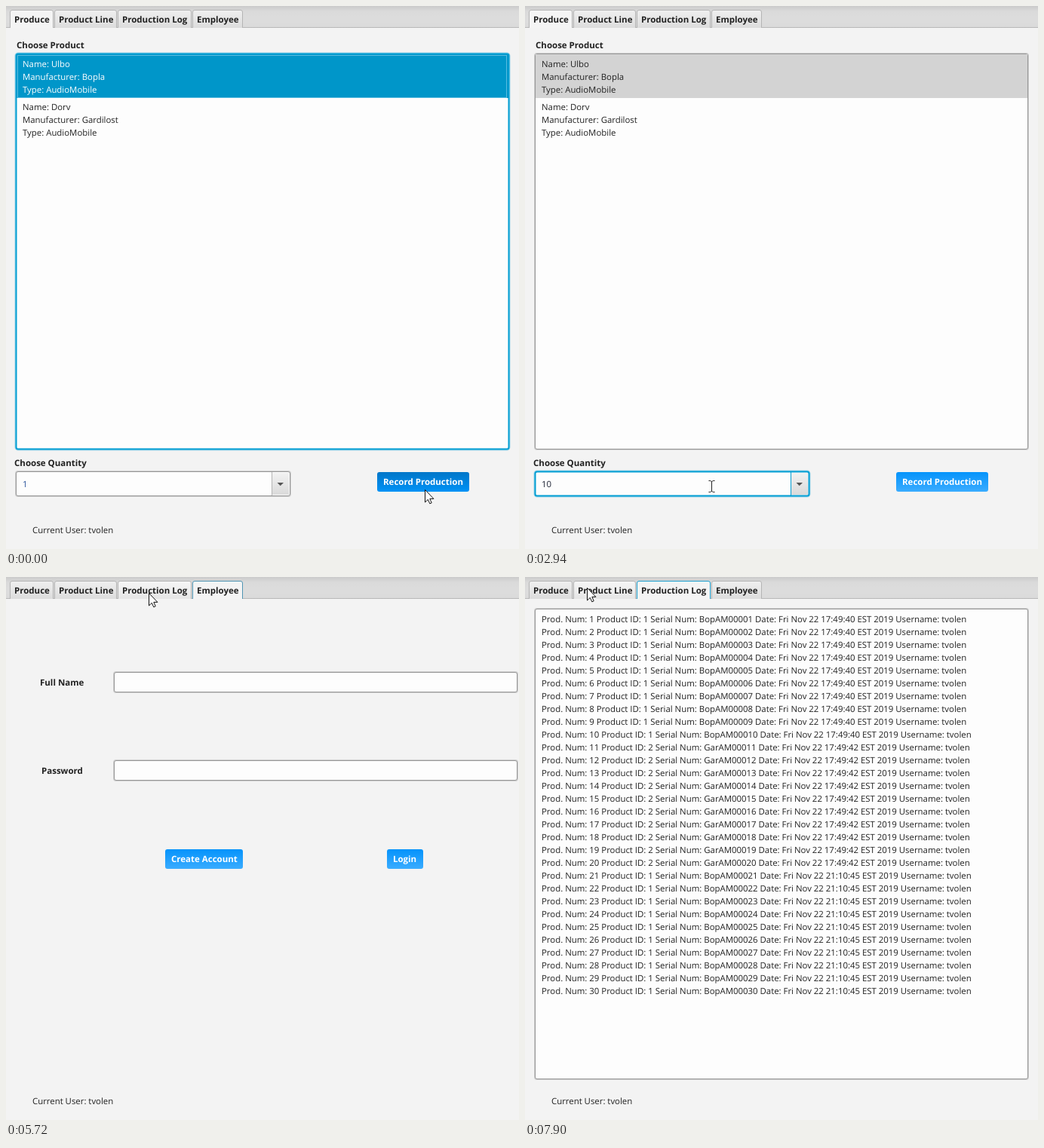
Animation of 680x720 px, one loop 8000 ms. Source, as an HTML page:

```html
<!DOCTYPE html>
<html lang="en">
<head>
<meta charset="utf-8">
<title>Production tracker</title>
<style>
  html, body { margin: 0; width: 100%; height: 100%; overflow: hidden; background: #f3f3f3; }
  svg { display: block; }
  text { font: 11.4px "Open Sans", "Noto Sans", sans-serif; fill: #222; white-space: pre; text-rendering: geometricPrecision; }
  .bold { font-weight: 700; font-size: 11.5px; }
  .button text { fill: #fff; }
  .button.hover rect { fill: url(#buttonHover); }
  .button.pressed rect { fill: url(#buttonPressed); }
  .box { fill: #fdfdfd; stroke: #979797; }
  .halo { fill: none; stroke: #8a8a8a; stroke-opacity: .35; stroke-width: 3; }
  .focused .box { stroke: #039ed3; stroke-width: 2; }
  .focused .halo { stroke: #039ed3; stroke-opacity: .35; stroke-width: 4; }
  .focused .divider { stroke: #039ed3; }
  .divider { stroke: #b5b5b5; }
  .tab path { fill: url(#tab); stroke: #b4b4b4; }
  .tab.hover path { fill: url(#tabHover); }
  .tab.selected path { fill: #f4f4f4; }
  .tab.focused path { stroke: #1a9fcf; }
  #tab-employee.focused path { stroke: #4f95b3; }
  .row { fill: #d3d3d3; }
  .ring { fill: none; stroke: #58bce0; visibility: hidden; }
  #products.focused .row { fill: #0096c9; }
  #products.focused .ring { visibility: visible; }
  #products.focused .chosen text { fill: #fff; }
  #status { font-size: 18.9px; fill: #000; }
</style>
</head>
<body>
<svg id="stage" width="680" height="720" viewBox="0 0 680 720"></svg>
<script>
const LOOP = 8000;
const USER = 'tvolen';

const text = (x, y, str, attrs = '') => `<text x="${x}" y="${y}" ${attrs}>${str}</text>`;
const bold = (x, y, str) => text(x, y, str, 'class="bold"');
const gradient = (id, ...colors) =>
  `<linearGradient id="${id}" x2="0" y2="1">${colors.map((c, i) =>
    `<stop offset="${i / (colors.length - 1)}" stop-color="${c}"/>`).join('')}</linearGradient>`;

// Bordered white box given by its outer edges
const box = (left, top, right, bottom) => {
  const frame = `x="${left + .5}" y="${top + .5}" width="${right - left - 1}" height="${bottom - top - 1}" rx="2.5"`;
  return `<rect class="halo" ${frame}/><rect class="box" ${frame}/>`;
};

const button = (id, x, y, width, label) =>
  `<g class="button" id="${id}"><rect x="${x}" y="${y}" width="${width}" height="26" rx="3" fill="url(#button)"/>
   ${bold(x + 8, y + 17, label)}</g>`;

const tabs = [
  { id: 'produce', left: 5, right: 63, label: 'Produce' },
  { id: 'line', left: 64, right: 147, label: 'Product Line' },
  { id: 'log', left: 148, right: 246, label: 'Production Log' },
  { id: 'employee', left: 247, right: 314, label: 'Employee' },
];
const tabMarkup = ({ id, left, right, label }) =>
  `<g class="tab" id="tab-${id}">
   <path d="M${left + .5} 29V8q0-2.5 2.5-2.5H${right - 3}q2.5 0 2.5 2.5V29"/>
   ${bold(left + 6, 22, label)}</g>`;

const product = (y, name, maker) =>
  [`Name: ${name}`, `Manufacturer: ${maker}`, 'Type: AudioMobile']
    .map((line, i) => text(22, y + 17 * i, line)).join('');

const logRow = (_, i) => {
  const n = i + 1;
  const second = n > 10 && n <= 20;
  const time = n <= 10 ? '17:49:40' : second ? '17:49:42' : '21:10:45';
  const serial = (second ? 'Gar' : 'Bop') + 'AM' + String(n).padStart(5, '0');
  return text(22, 60 + 17 * i,
    `Prod. Num: ${n} Product ID: ${second ? 2 : 1} Serial Num: ${serial} Date: Fri Nov 22 ${time} EST 2019 Username: ${USER}`);
};

const $ = id => document.getElementById(id);

$('stage').innerHTML = `
  <defs>
    ${gradient('header', '#cbcbcb', '#dadada', '#dcdcdc', '#dcdcdc', '#dadada')}
    ${gradient('tab', '#efefef', '#e6e6e6', '#dcdcdc')}
    ${gradient('tabHover', '#f6f6f6', '#eeeeee', '#e5e5e5')}
    ${gradient('arrowButton', '#f2f2f2', '#dadada')}
    ${gradient('button', '#0593fb', '#3aacff')}
    ${gradient('buttonHover', '#0076c8', '#0092f6')}
    ${gradient('buttonPressed', '#0068b2', '#0080d8')}
  </defs>
  <rect width="680" height="720" fill="#f3f3f3"/>
  <rect width="680" height="28" fill="url(#header)"/>
  <rect y="28" width="680" height="1" fill="#b8b8b8"/>
  ${tabs.map(tabMarkup).join('')}
  <g id="page-produce">
    ${bold(14, 56, 'Choose Product')}
    <g id="products">
      ${box(13, 63, 667, 588)}
      <rect class="row" x="14" y="64" width="652" height="58"/>
      <rect class="ring" x="15.5" y="65.5" width="648" height="56"/>
      <g class="chosen">${product(81, 'Ulbo', 'Bopla')}</g>
      ${product(138, 'Dorv', 'Gardilost')}
    </g>
    ${bold(11, 610, 'Choose Quantity')}
    <g id="quantity">
      ${box(13, 617, 377, 650)}
      <rect x="352" y="619" width="23" height="29" fill="url(#arrowButton)"/>
      <path class="divider" d="M352.5 618V649"/>
      <path d="M359.5 632H368L363.7 636.3Z" fill="#555"/>
    </g>
    ${text(22, 638, '', 'id="amount"')}
    <rect id="caret" y="624" width="1" height="19" fill="#333"/>
    ${button('record', 492, 618, 122, 'Record Production')}
    ${text(14, 677, 'Production Recorded', 'id="status"')}
  </g>
  <g id="page-employee">
    ${bold(45, 144, 'Full Name')}${box(143, 126, 678, 153)}
    ${bold(47, 261, 'Password')}${box(143, 243, 678, 270)}
    ${button('create', 211, 361, 103, 'Create Account')}
    ${button('login', 505, 361, 48, 'Login')}
  </g>
  <g id="page-log">
    ${box(13, 42, 667, 666)}
    ${Array.from({ length: 30 }, logRow).join('')}
  </g>
  ${text(35, 699, `Current User: ${USER}`)}
  <path id="arrow" d="M.5 .5V17L4.3 13.4 6.8 18.9 9.2 17.8 6.8 12.4H11.9Z" fill="#fff" stroke="#111"/>
  <path id="beam" d="M-3.5-7.5H-1.5L.5-6.5 2.5-7.5H4.5M.5-6.5V6.5M-3.5 7.5H-1.5L.5 6.5 2.5 7.5H4.5"
    fill="none" stroke="#222"/>`;

// Pointer moves: start, end, x, y
const start = [555, 641];
const moves = [
  [60, 580, 248, 637],
  [870, 880, 247, 637],
  [3110, 3480, 615, 636],
  [3480, 3580, 600, 634],
  [3980, 4480, 249, 14],
  [4480, 4610, 274, 17],
  [5560, 5715, 189, 21],
  [5975, 6480, 409, 349],
  [7380, 7780, 68, 9],
  [7780, 7890, 82, 14],
];

function pointerAt(t) {
  let [x, y] = start;
  for (const [from, to, nextX, nextY] of moves) {
    if (t < from) break;
    const p = Math.min(1, (t - from) / (to - from));
    const eased = p * p * (3 - 2 * p);
    x += (nextX - x) * eased;
    y += (nextY - y) * eased;
  }
  return [Math.round(x), Math.round(y)];
}

// Caret: on, off, x
const carets = [[760, 1220, 28], [1460, 1980, 21.5], [2260, 2430, 28], [2430, 2940, 34.5]];

const show = (id, on) => { $(id).style.display = on ? '' : 'none'; };
const flag = (id, name, on) => $(id).classList.toggle(name, on);

function draw(t) {
  const [x, y] = pointerAt(t);
  const inside = (left, top, right, bottom) => x >= left && x < right && y >= top && y < bottom;
  const page = t < 5020 ? 'produce' : t < 5960 ? 'employee' : 'log';

  for (const { id, left, right } of tabs) {
    flag('tab-' + id, 'selected', id === page);
    flag('tab-' + id, 'focused', id === page && page !== 'produce');
    flag('tab-' + id, 'hover', inside(left, 5, right, 29));
  }
  for (const id of ['produce', 'employee', 'log']) show('page-' + id, id === page);

  flag('products', 'focused', t < 600);
  flag('quantity', 'focused', t >= 600 && t < 3610);
  flag('record', 'hover', inside(492, 618, 614, 644));
  flag('record', 'pressed', t >= 3610 && t < 3680);
  show('status', t >= 3680);

  const amount = t < 1460 ? '1' : t < 2260 ? '' : t < 2430 ? '1' : '10';
  $('amount').textContent = amount;
  $('amount').style.fill = amount === '1' ? '#2c559c' : '#222838';
  const caret = carets.find(([on, off]) => t >= on && t < off);
  show('caret', caret);
  if (caret) $('caret').setAttribute('x', caret[2]);

  const overField = page === 'produce' && inside(14, 618, 352, 649);
  show('arrow', !overField);
  show('beam', overField);
  $(overField ? 'beam' : 'arrow').setAttribute('transform', `translate(${x} ${y})`);
}

const began = performance.now();
function tick() {
  draw((performance.now() - began) % LOOP);
  requestAnimationFrame(tick);
}
tick();
</script>
</body>
</html>
```
